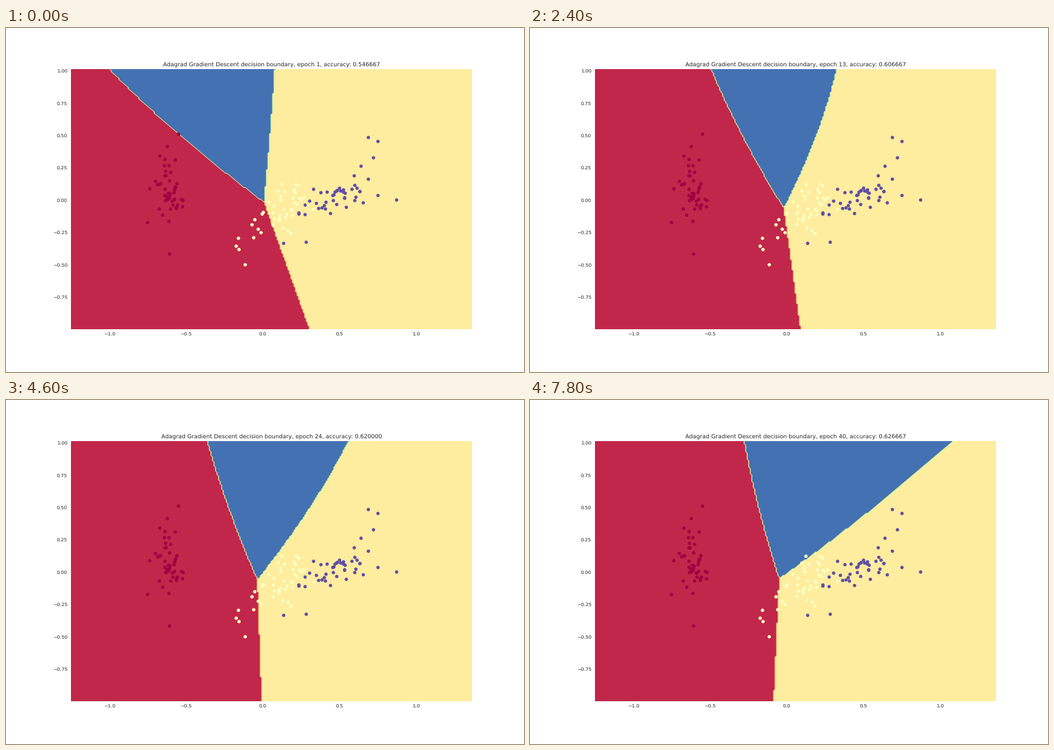
Write a matplotlib script that moves like this. It is 917x611 px and loops after 8000 ms.

```python
import numpy as np
import matplotlib.pyplot as plt
from matplotlib.animation import FuncAnimation

W, H, DPI = 917, 611, 61.12
EPOCHS = 40
TOP, BOTTOM = 0.12 * H, 0.875 * H
STEP = 0.01
XLIM, YLIM = (-1.2525, 1.3675), (-0.993, 1.017)
INK = "#262626"

plt.rcParams.update({"font.family": "DejaVu Sans", "text.color": INK,
                     "text.hinting": "none"})

fig = plt.figure(figsize=(W / DPI, H / DPI), dpi=DPI, facecolor="white")
ax = fig.add_axes([0.125, 0.125, 0.775, 0.755])
ax.set_xlim(XLIM)
ax.set_ylim(YLIM)

cmap = plt.get_cmap("Spectral")
ax.set_facecolor(cmap(1 / 16))
ax.spines[:].set_visible(False)
ax.tick_params(length=0, pad=7, labelsize=10, labelcolor=INK)
ax.set_xticks(np.arange(-1, 1.1, 0.5))
ax.set_yticks(np.arange(-0.75, 1.1, 0.25))
title = ax.set_title("", fontsize=12, pad=6)

# The grid reaches one cell past the axes so that its rim stays hidden
xs = np.arange(XLIM[0] - STEP, XLIM[1] + 1.5 * STEP, STEP)
ys = np.arange(YLIM[0] - STEP, YLIM[1] + 1.5 * STEP, STEP)
col_px = (0.125 + 0.775 * (xs - XLIM[0]) / np.ptp(XLIM)) * W
row_px = BOTTOM + (TOP - BOTTOM) * (ys - YLIM[0]) / np.ptp(YLIM)

rng = np.random.default_rng(12)


def cloud(n, center, spread, tilt, outliers):
    """Sloping normal cloud in stage pixels, plus its stray samples."""
    dx, dy = np.clip(rng.normal(size=(2, n)), -2, 2) * np.array(spread)[:, None]
    core = np.column_stack([center[0] + dx, center[1] + tilt * dx + dy])
    return np.vstack([core, outliers])


CLOUDS = [
    cloud(41, (289, 287), (13, 28), 0,
          [(305, 188), (285, 210), (272, 227), (254, 285), (250, 345),
           (289, 401)]),
    cloud(39, (492, 323), (26, 24), -0.5,
          [(435, 349), (411, 373), (438, 372), (407, 387), (412, 393),
           (423, 420)]),
    cloud(42, (588, 297), (35, 17), -0.45,
          [(641, 194), (658, 201), (650, 230), (691, 305), (531, 380),
           (491, 382)]),
]
for pts, shade in zip(CLOUDS, (0.0, 0.5, 1.0)):
    dots = ax.transData.inverted().transform(pts * (1, -1) + (0, H))
    ax.scatter(*dots.T, s=50, color=cmap(shade), linewidth=0, zorder=3)


def arc(x0, y0, x1, y1, bulge):
    """Column of a bowed line from (x0, y0) to (x1, y1) at every row."""
    t = (row_px - y0) / (y1 - y0)
    return x0 + (x1 - x0) * t + 4 * bulge * t * (1 - t)


def predict(e):
    """Class of every grid node after e further epochs."""
    jx = 437 + 19.5 * np.exp(-e / 25)
    jy = 321 - 12 * np.exp(-e / 3) - 0.1 * e
    top_left = 425 - 242 / (1 + 0.11 * e)
    top_right = 475.5 + 5.6 * e + 53 * ((e + 1) / EPOCHS) ** 7
    foot = 370 + 167 / (1 + 0.0445 * e)

    lower = arc(jx, jy, foot, BOTTOM, 0)
    left = arc(jx, jy, top_left, TOP, -4 - 7 * np.exp(-e / 10))
    right = arc(jx, jy, top_right, TOP, 9 - 8 * np.exp(-e / 4))
    above = row_px < jy
    red = col_px < np.where(above, left, lower)[:, None]
    blue = col_px < np.where(above, right, lower)[:, None]
    return np.where(red, 0.0, np.where(blue, 2.0, 1.0))


layers = []


def draw(i):
    while layers:
        layers.pop().remove()
    z = predict(i)
    for k in range(1, 8):
        layers.append(ax.contourf(xs, ys, z, [k / 4, 3], antialiased=True,
                                  colors=[cmap((k + 0.5) / 8)], zorder=1))
    ax.set(xlim=XLIM, ylim=YLIM)
    hits = int(95 - 13 * np.exp(-i / 10))
    title.set_text("Adagrad Gradient Descent decision boundary, "
                   f"epoch {i + 1}, accuracy: {hits / 150:.6f}")
    return layers + [title]


anim = FuncAnimation(fig, draw, frames=EPOCHS, interval=200, repeat=True,
                     repeat_delay=0, blit=False)
plt.show()
```
